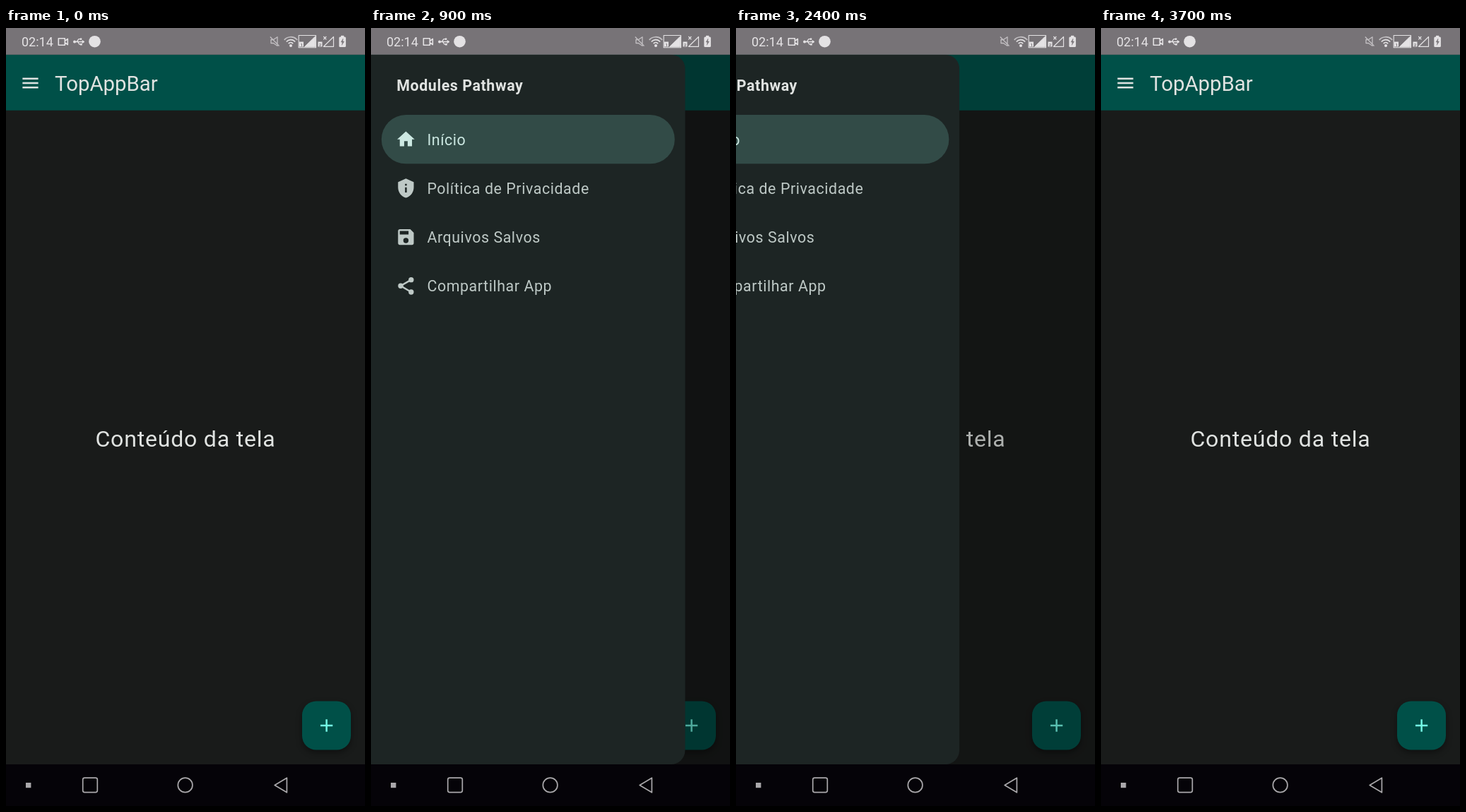
Animation of 508 by 1102 pixels, one loop 6.8 s. Source, as an HTML page with a canvas:

```html
<!DOCTYPE html>
<html lang="pt-BR">
<head>
<meta charset="utf-8">
<title>Navigation drawer</title>
<style>
html, body { margin: 0; width: 100%; height: 100%; overflow: hidden; background: #050308; }
canvas { display: block; width: 508px; height: 1102px; }
</style>
</head>
<body>
<canvas id="stage"></canvas>
<script>
const W = 508, H = 1102, TOP = 37.7, BOTTOM = 1043;
const LOOP = 6800, STEP = 100, SLIDE = 256;
const DP = 1.235, SP = 1.335, DRAWER = 444.5, SPACING = 0.58;
const FONT = 'Roboto, sans-serif';

const canvas = document.getElementById('stage');
const ctx = canvas.getContext('2d');
const ratio = window.devicePixelRatio || 1;
canvas.width = W * ratio;
canvas.height = H * ratio;

// Drawer moves: start time and the state it settles in
const moves = [
  { at: 552.4, open: 1 },
  { at: 1438.6, open: 0 },
  { at: 2283.7, open: 1 },
  { at: 3440, open: 0 }
];

const icons = {
  home: new Path2D('M10 20v-6h4v6h5v-8h3L12 3 2 12h3v8z'),
  shield: new Path2D('M12 1L3 5v6c0 5.55 3.84 10.74 9 12 5.16-1.26 9-6.45 9-12V5zM11 7h2v2h-2zM11 11h2v6h-2z'),
  save: new Path2D('M17 3H5c-1.1 0-2 .9-2 2v14c0 1.1.9 2 2 2h14c1.1 0 2-.9 2-2V7zM12 19a3 3 0 1 1 0-6 3 3 0 0 1 0 6zM15 9H5V5h10z'),
  share: new Path2D('M15 5a3 3 0 1 0 6 0a3 3 0 1 0-6 0M3 12a3 3 0 1 0 6 0a3 3 0 1 0-6 0M15 19a3 3 0 1 0 6 0a3 3 0 1 0-6 0'),
  menu: new Path2D('M3 6h18v2H3zM3 11h18v2H3zM3 16h18v2H3z'),
  plus: new Path2D('M19 13h-6v6h-2v-6H5v-2h6V5h2v6h6z')
};

const items = [
  ['home', 'Início'],
  ['shield', 'Política de Privacidade'],
  ['save', 'Arquivos Salvos'],
  ['share', 'Compartilhar App']
];

const clamp = v => Math.min(1, Math.max(0, v));

// Cubic bezier (.4, 0, .2, 1), solved by bisection
function ease(x) {
  x = clamp(x);
  let lo = 0, hi = 1;
  for (let i = 0; i < 24; i++) {
    const s = (lo + hi) / 2, r = 1 - s;
    if (1.2 * r * r * s + 0.6 * r * s * s + s * s * s < x) lo = s; else hi = s;
  }
  return lo * lo * (3 - 2 * lo);
}

function openness(t) {
  let value = 0;
  for (const m of moves) {
    if (t >= m.at) value += (m.open - value) * ease((t - m.at) / SLIDE);
  }
  return value < 0.0005 ? 0 : value;
}

function rect(x, y, w, h, color) {
  ctx.fillStyle = color;
  ctx.fillRect(x, y, w, h);
}

function round(x, y, w, h, r, color) {
  ctx.beginPath();
  ctx.roundRect(x, y, w, h, r);
  ctx.fillStyle = color;
  ctx.fill();
}

function disc(x, y, r, color) {
  ctx.beginPath();
  ctx.arc(x, y, r, 0, Math.PI * 2);
  ctx.fillStyle = color;
  ctx.fill();
}

function line(d, color, width = 1.5, filled = false) {
  const path = new Path2D(d);
  ctx.lineWidth = width;
  ctx.strokeStyle = ctx.fillStyle = color;
  ctx.stroke(path);
  if (filled) ctx.fill(path);
}

function text(str, x, y, size, color, spacing = 0, weight = 400) {
  ctx.font = `${weight} ${size}px ${FONT}`;
  ctx.letterSpacing = spacing + 'px';
  ctx.fillStyle = color;
  ctx.fillText(str, x, y);
}

function icon(name, cx, cy, color) {
  ctx.save();
  ctx.translate(cx, cy);
  ctx.scale(DP, DP);
  ctx.translate(-12, -12);
  ctx.fillStyle = color;
  ctx.fill(icons[name], 'evenodd');
  if (name === 'share') line('M18 5L6 12L18 19', color, 2);
  ctx.restore();
}

function statusBar() {
  const light = '#e4e2e4', dim = '#c3c0c3';
  rect(0, 0, W, TOP, '#777377');
  text('02:14', 22, 26, 18, light);
  ctx.lineJoin = 'round';

  // camera and USB
  line('M74.3 14.8h9v9.4h-9zM84 18l3.3-2.6v8.2L84 21', light, 1.6);
  line('M97 19.5h11M100 19.5l3-3.8h2.5M101.5 19.5l2.5 3.6h2', light, 1.3);
  line('M108 17.6l3 1.9-3 1.9z', light, 0.8, true);
  disc(97, 19.5, 2, light);
  disc(106, 15.7, 1.4, light);
  rect(105, 21.8, 2.7, 2.7, light);
  disc(125.5, 19.2, 8.3, light);

  // muted speaker
  line('M375 16.5h3.5l5.5-3.8v12.6l-5.5-3.8H375zM373.8 12.5l12.7 13', dim, 1.3);

  // wifi
  for (let i = 0; i < 3; i++) {
    ctx.beginPath();
    ctx.arc(403, 25, 4.3 + i * 4, -Math.PI * 0.77, -Math.PI * 0.23);
    ctx.lineWidth = 1.7;
    ctx.strokeStyle = i === 2 ? dim : light;
    ctx.stroke();
  }
  disc(403, 25, 2, light);

  // two signal meters
  line('M414.2 10.5h24.3v17.3h-24.3z', light, 1.1);
  line('M437.5 12v14.5h-15z', light, 0.8, true);
  line('M463.5 12.5v13.8h-14z', light, 1.2);
  line('M449.3 12l4 4.4M453.3 12l-4 4.4', light, 1.2);
  rect(415, 19.5, 6, 7, light);
  rect(441.5, 19.5, 6, 7, light);
  text('1', 416.5, 25.5, 6, '#777377', 0, 700);
  text('2', 442.8, 25.5, 6, '#777377', 0, 700);

  // charging battery
  round(471.3, 12.5, 9.6, 14.6, 1.5, light);
  rect(474, 10.8, 4.2, 2.2, light);
  line('M477 15l-3 5h2l-.7 4.3 3.2-5.3h-2z', '#777377', 0.4, true);
}

function navBar() {
  const gray = '#aaa8ab';
  rect(0, BOTTOM, W, H - BOTTOM, '#050308');
  rect(28, 1069, 7.4, 7.2, gray);
  ctx.strokeStyle = gray;
  ctx.lineWidth = 1.7;
  ctx.beginPath();
  ctx.roundRect(108.7, 1062.1, 20.6, 20.5, 2.5);
  ctx.stroke();
  ctx.beginPath();
  ctx.arc(253.6, 1072.4, 10.3, 0, Math.PI * 2);
  ctx.stroke();
  line('M380.2 1072.5L397.4 1062.2v20.6z', gray, 1.7);
}

function screen(t) {
  rect(0, TOP, W, BOTTOM - TOP, '#191b1a');
  rect(0, TOP, W, 79, '#005048');
  icon('menu', 34.5, 78, '#e0e3e1');
  text('TopAppBar', 69.1, 89, 22 * SP, '#e0e3e1');
  if (t >= 500 && t < 700) disc(34.5, 78, 20 * DP, 'rgba(224,227,225,.08)');

  ctx.textAlign = 'center';
  text('Conteúdo da tela', 254, 593, 24 * SP, '#e0e3e1', 0.8);
  ctx.textAlign = 'left';

  ctx.save();
  ctx.shadowColor = 'rgba(0,0,0,.4)';
  ctx.shadowBlur = 9 * ratio;
  ctx.shadowOffsetY = 4 * ratio;
  round(419, 953.5, 69, 69, 20, '#005048');
  ctx.restore();
  icon('plus', 453.6, 988, '#74f8e5');
}

function ripple(t, y) {
  if (t < 3400 || t >= 3700) return;
  const u = clamp((t - 3300) / 225);
  const alpha = 0.09 * (1 - clamp((t - 3500) / 150));
  ctx.save();
  ctx.beginPath();
  ctx.roundRect(14.8, y - 34.6, 415, 69.2, 34.6);
  ctx.clip();
  disc(35 + 187 * u, y, 124 + 98 * ease(u), `rgba(225,225,225,${alpha})`);
  ctx.restore();
}

function drawer(t, open) {
  rect(0, TOP, W, BOTTOM - TOP, `rgba(0,0,0,${0.32 * open})`);
  ctx.save();
  ctx.translate(DRAWER * (open - 1), 0);
  round(0, TOP, DRAWER, BOTTOM - TOP, [0, 20, 20, 0], '#1d2524');
  text('Modules Pathway', 36.3, 89, 16 * SP, '#e0e3e1', SPACING, 700);
  items.forEach(([name, label], i) => {
    const y = 157.7 + 69.2 * i;
    const color = i ? '#bec9c6' : '#cce8e2';
    if (!i) round(14.8, y - 34.6, 415, 69.2, 34.6, '#324b47');
    if (i === 1) ripple(t, y);
    icon(name, 49.4, y, color);
    text(label, 79.4, y + 8, 16 * SP, color, SPACING);
  });
  ctx.restore();
}

function draw(t) {
  ctx.setTransform(ratio, 0, 0, ratio, 0, 0);
  screen(t);
  const open = openness(t);
  if (open > 0) drawer(t, open);
  statusBar();
  navBar();
}

const start = performance.now();
function tick() {
  const t = (performance.now() - start) % LOOP;
  draw(Math.floor(t / STEP) * STEP);
  requestAnimationFrame(tick);
}
tick();
</script>
</body>
</html>
```
